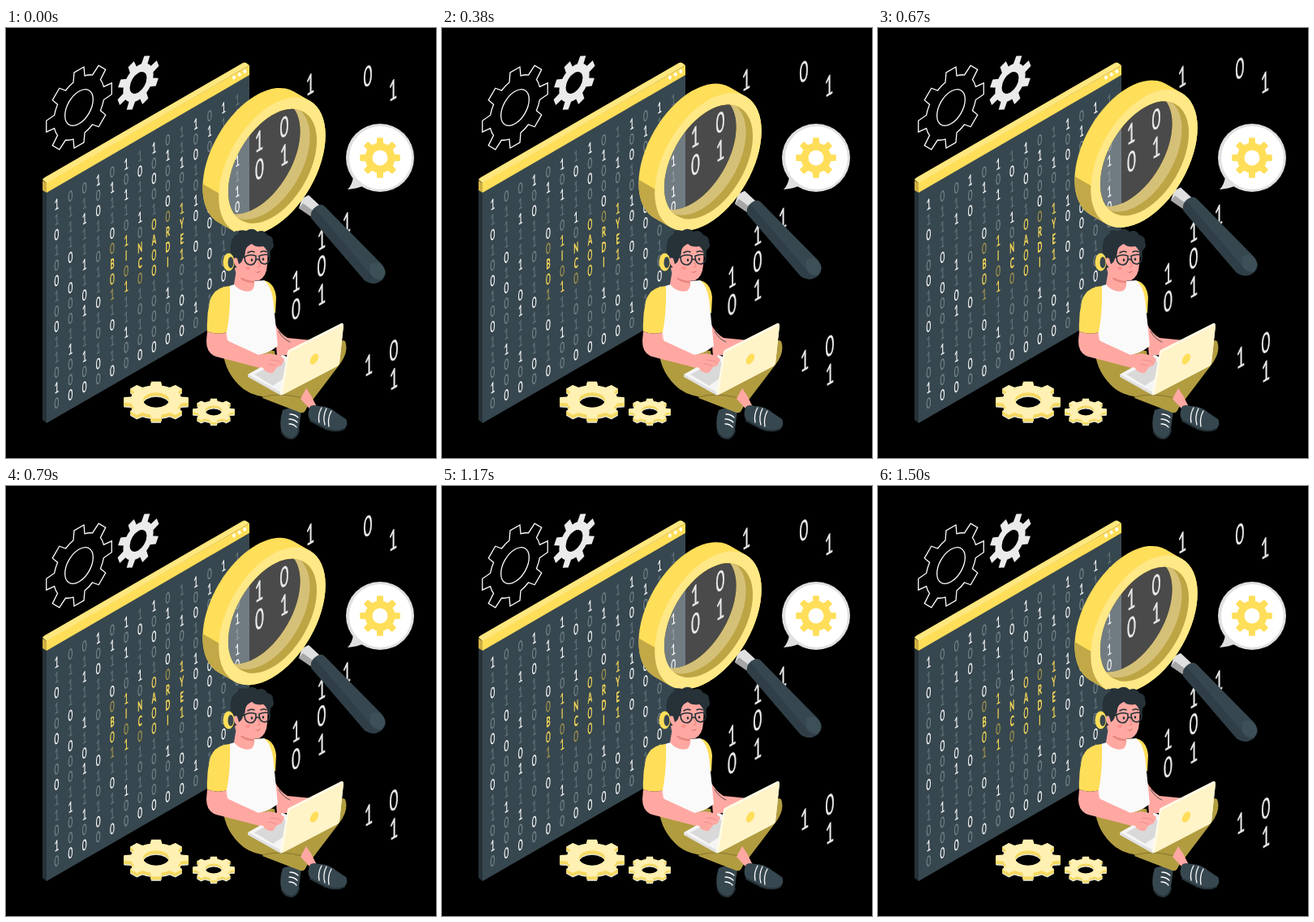
These frames come from a looping animation (530 by 530 pixels, 1.54 s). An HTML page:

```html
<!DOCTYPE html>
<html lang="en">
<head>
<meta charset="utf-8">
<title>Binary search scene</title>
<style>
html, body { margin: 0; width: 100%; height: 100%; overflow: hidden; background: #000; }
svg { display: block; width: 100vw; height: 100vh; }
text { font-family: Lato, "DejaVu Sans", sans-serif; text-anchor: middle; }
</style>
</head>
<body>
<svg id="stage" viewBox="0 0 530 530"></svg>
<script>
const YELLOW = '#ffde59', PALE = '#fff0b3', CREAM = '#fff3c8', NAVY = '#37474f', INK = '#263238';
const SKIN = '#ffa8a2', OLIVE = '#b19c40', ROSE = '#e88680';

const poly = (pts, fill, more = '') => `<polygon points="${pts}" fill="${fill}" ${more}/>`;
const path = (d, fill, more = '') => `<path d="${d}" fill="${fill}" ${more}/>`;
const line = (d, color, w = 1) => path(d, 'none', `stroke="${color}" stroke-width="${w}" stroke-linecap="round" stroke-linejoin="round"`);
const oval = (x, y, rx, ry, fill, more = '') => `<ellipse cx="${x}" cy="${y}" rx="${rx}" ry="${ry}" fill="${fill}" ${more}/>`;
const wall = (x, y, k = 1) => `transform="matrix(${.866 * k} ${-.5 * k} 0 1 ${x} ${y})"`;
const floor = (x, y) => `transform="matrix(1 0 0 .577 ${x} ${y})"`;
const disc = (x, y, r, fill, more = '') => `<circle r="${r}" fill="${fill}" ${wall(x, y)} ${more}/>`;

function glyph(ch, x, y, size, fill, bold = false) {
  return `<text ${wall(x, y + size * .36, bold ? .52 : .64)} font-size="${size}" font-weight="${bold ? 700 : 400}" ` +
    `fill="${fill}" stroke="${fill}" stroke-width="${size * .015}">${ch}</text>`;
}

// Eight-toothed gear with a round hole
function gear(R, root, hole, turn = 0) {
  const at = (r, deg) => {
    const a = (deg + turn) * Math.PI / 180;
    return `${(r * Math.cos(a)).toFixed(2)} ${(r * Math.sin(a)).toFixed(2)}`;
  };
  let d = '';
  for (let a = 0; a < 360; a += 45) {
    d += `${a ? `A${root} ${root} 0 0 1 ` : 'M'}${at(root, a - 13)}L${at(R, a - 8.5)}L${at(R, a + 8.5)}L${at(root, a + 13)}`;
  }
  d += `A${root} ${root} 0 0 1 ${at(root, -13)}Z`;
  return d + `M${hole} 0A${hole} ${hole} 0 1 0 ${-hole} 0A${hole} ${hole} 0 1 0 ${hole} 0Z`;
}

function floorGear(x, y, R, depth) {
  const d = gear(R, R * .79, R * .4);
  let out = '';
  for (let k = depth; k > 0; k -= .5) out += path(d, k > depth - 1.5 ? '#e0e0d0' : '#f5d95f', floor(x, y + k));
  return out + path(d, PALE, floor(x, y)) +
    path(`M${x - R * .4} ${y}a${R * .4} ${R * .23} 0 0 1 ${R * .8} 0a${R * .4} ${R * .23} 0 0 0 ${-R * .8} 0`, '#d9bd55', `transform="translate(0 1)"`);
}

// Columns of the screen: 0/1 bright, o/l faint, z/i yellow, q/j dim yellow
const columns = [
  '1l0lo0lo0llo1o', 'olll0l0ool1oo0', 'ol1ll1l01ll1o0', '1o0lloll0lol0o',
  'o1ll0qBzjl0ll0', '1o1loiIqill1oo', 'l0ll1oNCqlolo0', '1o0olzAzzlooo0',
  'o1oo0qRDIl1ol0', 'll1oliYEiol0o0', '1o0lo10l0lll1o', 'o1olll00l0l0ll',
  '1lololololo0lo', 'l1oo1l10oloool'
];
const inks = { 0: '#fff', 1: '#fff', o: '#78858b', l: '#65747b', q: '#a5974f', j: '#a5974f' };

function screenDigits() {
  return columns.map((col, i) => [...col].map((c, r) => {
    const ch = 'ozq'.includes(c) ? '0' : 'lij'.includes(c) ? '1' : c;
    const bold = /[A-Z]/.test(c);
    return glyph(ch, 62.3 + 17.15 * i, 217 - 9.9 * i + 18.85 * r, bold ? 17 : 18, inks[c] || YELLOW, bold);
  }).join('')).join('');
}

function screen() {
  return poly('45,199 50,203 50,487 45,483', INK) +
    poly('50,202 300,58 300,343 50,487', NAVY) +
    path('M45 188L50 191V203L45 200Z', '#cfb044') +
    poly('50,190 300,46 300,58 50,203', YELLOW) +
    path('M45 187Q46 185 48 184L292 43Q294 42 296 43L300 46L50 191Z', '#ffe77f') +
    [[281, 61], [287.7, 57.2], [294.3, 53.4]].map(p => oval(...p, 1.9, 2.4, '#fff')).join('') +
    screenDigits();
}

function backdrop() {
  return path(gear(47, 36, 20), 'none', `${wall(90, 98)} stroke="#fff" stroke-width="1.3" vector-effect="non-scaling-stroke"`) +
    path(gear(30, 21.5, 12, -20), '#ebebeb', wall(163, 67.5)) +
    path('M428 183Q427 193 421 199Q434 198 441 194Z', '#e0e0e0') +
    oval(461, 160, 42, 42, '#e0e0e0') + oval(461.5, 160, 38.5, 39, '#fff') +
    path(gear(25, 18.5, 9.5), YELLOW, 'transform="translate(461 160)"') +
    floorGear(185, 458.5, 40, 5.5) + floorGear(256, 471.5, 26, 4);
}

const loose = [[375, 69, 1], [446, 59, 0], [477, 76, 1], [420, 240, 1], [389, 260, 1], [389, 293, 0],
  [389, 328, 1], [357.5, 312, 1], [357.5, 346, 0], [447, 415, 1], [478, 397, 0], [478, 432, 1]];
const inLens = [[312, 139, 1], [343, 121.5, 0], [312.5, 173.5, 0], [343, 156, 1]];
const big = list => list.map(([x, y, n]) => glyph(n, x, y, 34, '#ebebeb')).join('');

function magnifier() {
  const x = 328, y = 170.3, R = 76, r = 63, a = 53.74;
  const hull = `M${a} ${-a}l-23 -23A${R} ${R} 0 0 0 ${-a - 23} ${a - 23}l23 23A${R} ${R} 0 0 0 ${a} ${-a}Z`;
  return `<defs>
    <clipPath id="tube"><path d="${hull}" ${wall(x, y)}/></clipPath>
    <clipPath id="front"><circle r="${r}" ${wall(x + .5, y)}/></clipPath>
    <mask id="hole" maskUnits="userSpaceOnUse" x="230" y="60" width="180" height="210">
      <rect x="230" y="60" width="180" height="210" fill="#fff"/>
      <g clip-path="url(#front)">${disc(x - 20, y - 11.5, r, '#000')}</g>
    </mask></defs>` +
    `<g clip-path="url(#front)">${disc(x - 20, y - 11.5, r, '#fff', 'opacity=".29"')}</g>` + big(inLens) +
    // grip
    poly('365,210 373,206 387,219 377,233 361,222', '#e0e0e0') +
    poly('361,222 366,216 381,227 377,233', '#a6a6a6') +
    path('M376 234Q374 223 386 218Q390 217 393 220L462 290Q472 301 464 310Q454 319 442 311Z', NAVY) +
    path('M376 234Q375 226 381 223L449 303Q454 309 464 310Q454 319 442 311Z', '#303f47') +
    path('M449 291Q460 286 465 294Q471 303 463 310Q454 312 449 303Z', '#455a64', 'opacity=".45"') +
    `<g mask="url(#hole)"><g clip-path="url(#tube)">
      <rect x="235" y="60" width="170" height="205" fill="${YELLOW}"/>` +
      poly('235,188 268,207 290,264 235,264', '#c2a846') + `</g>` +
    disc(x, y, R, '#ffe886') + disc(x + .5, y, r, '#bda544') +
    `<g clip-path="url(#front)">${disc(x - 8, y - 4.8, r, '#d5c078')}</g></g>`;
}

function legs() {
  return path('M341 471Q336 487 340 499Q344 507 353 506Q360 504 361 494L364 472Q352 466 341 471Z', NAVY) +
    line('M350 476q6 0 10 4M349 482q6 0 10 4M349 488q6 0 9 4', '#fff', 1.3) +
    line('M340 498Q345 507 353 506Q359 504 361 496', INK, 2) +
    path('M418 386Q423 399 411 415L370 469Q368 477 360 473L316 456L340 432L398 391Q410 382 418 386Z', OLIVE) +
    path('M267 391Q267 420 287 440Q298 452 320 455L362 473Q370 474 372 464L377 449L338 440L331 398Z', OLIVE) +
    line('M316 455Q340 448 372 458', '#8f7c2f', 1.1) +
    path('M370 444L363 457L374 469L383 467L376 453Z', SKIN) +
    path('M374 468Q376 463 386 466Q398 466 407 474L419 482Q423 489 416 495Q407 499 394 494L377 485Q370 480 374 468Z', NAVY) +
    line('M389 468q-5 9 -3 18M395 469q-5 10 -2 20M401 472q-5 9 -3 19', '#fff', 1.3) +
    line('M375 484L394 494Q408 499 417 494', INK, 2);
}

function torso() {
  return path('M331 364Q337 376 347 382L378 385L352 402L334 405Z', SKIN) + line('M336 374q6 10 14 13', INK, .8) +
    path('M317 311Q331 313 333 332L332 352L322 340Z', YELLOW) +
    path('M275 318L292 313L318 311Q328 318 330 342L335 392Q316 407 297 402Q279 398 270 388L272 350Z', '#fafafa') +
    path('M284 298L281 316Q290 327 302 324Q307 321 306 311L302 300Z', SKIN) +
    path('M289 309Q296 315 306 314L306 311L294 303Z', ROSE) +
    path('M276 318Q256 319 251 337Q247 356 248 374Q261 379 272 375Q277 350 276 318Z', YELLOW) +
    path('M248 374Q261 379 272 375Q270 382 274 386L311 403Q327 399 339 405Q346 409 341 412Q344 418 332 421Q324 428 317 420L259 405Q247 401 247 386Z', SKIN);
}

function laptop() {
  return poly('298,427 341,403 385,422 339,451', '#f5f5f5') + poly('306,427 339,409 360,420 329,441', '#d9d9d9') +
    poly('298,427 339,449 339,453 298,430', '#e0e0e0') +
    path('M272 376Q270 382 274 386L311 403Q327 399 339 405Q346 409 341 412Q342 416 334 418L329 425Q320 426 317 419L275 408Z', SKIN) +
    line('M326 409q8 0 13 3M323 414q6 0 10 3', ROSE, .8) +
    path('M347 399Q347 397 350 396L413 364Q416 363 416 367L411 413Q411 415 408 417L341 452Q338 453 338 450Z', '#fffbe6') +
    path('M349 400L413 367Q416 364 416 367L411 413Q411 415 408 417L341 452Z', CREAM) +
    disc(380, 408, 6, YELLOW);
}

function head() {
  return path('M283 276Q279 294 285 304Q298 314 312 311Q321 307 322 292L323 268L306 260Z', SKIN) +
    path('M276 283Q270 266 279 255Q287 247 296 250Q304 245 310 251Q318 248 322 255Q330 257 329 264Q332 270 326 274Q326 281 323 283Q323 273 317 269Q308 271 303 266Q296 269 295 275Q295 281 292 284Q291 289 287 291L283 296Z', INK) +
    line('M276 282Q271 260 284 252', NAVY, 4) +
    oval(279, 288, 5, 9.5, INK) + oval(274.5, 288.5, 7, 11, YELLOW) + oval(277, 289, 3.5, 7, NAVY) +
    path('M285 284Q280 281 281 289Q283 296 288 295Z', SKIN) +
    line('M288 282L294 283M308 286q2 -2 4 0', INK, 1.4) +
    path('M294 282Q301 278 308 281Q309 291 302 292Q294 292 294 282Z', 'none', `stroke="${INK}" stroke-width="1.6"`) +
    path('M312 281Q319 278 325 280Q326 290 319 291Q312 291 312 281Z', 'none', `stroke="${INK}" stroke-width="1.6"`) +
    oval(303, 286, 1.3, 1.7, INK) + oval(317, 285, 1.3, 1.7, INK) +
    line('M298 277q4 -3 8 -1M314 276q4 -2 7 0', INK, 1.6) +
    line('M311 288l2 6l-3 1', ROSE, 1) + path('M304 299Q309 303 314 299Q311 304 304 299Z', '#b94f50') +
    oval(298, 296, 3, 2, '#ff918c');
}

const stage = document.getElementById('stage');
stage.innerHTML = backdrop() + screen() + `<g id="float">${big(loose)}${magnifier()}</g>` +
  legs() + torso() + laptop() + head();
const float = document.getElementById('float');

const LOOP = 1540, SWING = 1500, LIFT = 10.6, TICK = 1000 / 24;

// Linear rise and fall, advanced at 24 steps a second
function draw(ms) {
  const t = Math.floor((ms % LOOP + 5) / TICK) * TICK;
  const p = Math.min(t / SWING, 1);
  const lift = LIFT * (1 - Math.abs(2 * p - 1));
  float.setAttribute('transform', `translate(0 ${-lift.toFixed(3)})`);
}

let start;
function loop(now) {
  start ??= now;
  draw(now - start);
  requestAnimationFrame(loop);
}
draw(0);
requestAnimationFrame(loop);
</script>
</body>
</html>
```
